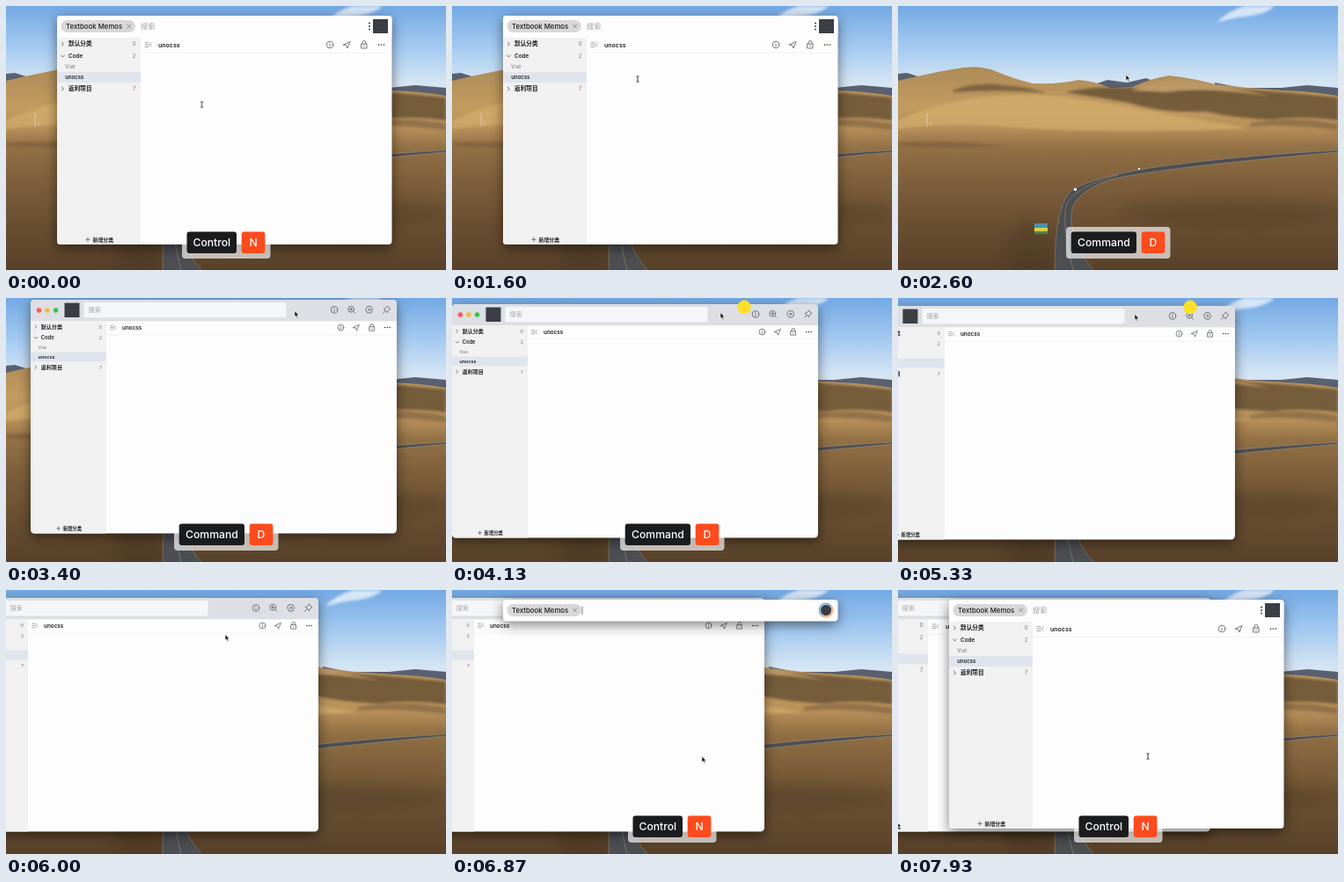
An HTML page for the animation above (8000 ms loop, 500 by 300 pixels).

```html
<!DOCTYPE html>
<html>
<head>
<meta charset="utf-8">
<title>Notes panel</title>
<style>
  html, body { margin: 0; width: 100%; height: 100%; overflow: hidden; background: #6b4d28; }
  svg.stage { display: block; width: 500px; height: 300px; }
  text { font-family: Inter, "Noto Sans CJK SC", "Noto Sans CJK", sans-serif; fill: #1d1d1f; }
  .bold { font-weight: 600; }
  .soft { fill: #777; }
  .hint { fill: #a3a3a6; }
  .line { fill: none; stroke: #55575b; stroke-width: .8; stroke-linecap: round; stroke-linejoin: round; }
  .key { font-size: 12.2px; font-weight: 500; fill: #fff; text-anchor: middle; }
  .shadow { filter: drop-shadow(0 4px 7px rgba(0, 0, 0, .5)); }

  /* One shared 8 s clock: 1% = 80 ms */
  .t { animation-duration: 8s; animation-iteration-count: infinite; animation-timing-function: step-end; }

  .popup { animation-name: popup; }
  @keyframes popup { 0% { display: inline } 31.6% { display: none } 84% { display: inline } }
  .open { animation-name: open; }
  @keyframes open { 0% { visibility: visible } 31.6% { visibility: hidden } 89.2% { visibility: visible } }
  .before { animation-name: before; }
  @keyframes before { 0% { visibility: inherit } 89.2% { visibility: hidden } }
  .after { animation-name: after; }
  @keyframes after { 0% { visibility: hidden } 89.2% { visibility: inherit } }
  .loading { animation-name: loading; }
  @keyframes loading { 0% { visibility: hidden } 84% { visibility: visible } 89.2% { visibility: hidden } }

  .window { animation-name: shown, drag; animation-timing-function: step-end, linear; }
  @keyframes shown { 0% { visibility: hidden } 36.25% { visibility: visible } }
  @keyframes drag {
    0%, 43.75% { transform: translate(28px, 2px) }
    51.625% { transform: translate(0, 7px) }
    66.625% { transform: translate(-33px, 9px) }
    71.25%, 100% { transform: translate(-61px, 9px) }
  }
  .press { animation-name: press; }
  @keyframes press { 0% { visibility: hidden } 43.75% { visibility: visible } 71.25% { visibility: hidden } }

  .control, .command { animation-timing-function: linear; }
  .control { animation-name: control; }
  @keyframes control { 0%, 9% { opacity: 1 } 11%, 82% { opacity: 0 } 82.5%, 100% { opacity: 1 } }
  .command { animation-name: command; }
  @keyframes command { 0%, 29.5% { opacity: 0 } 30%, 55% { opacity: 1 } 57%, 100% { opacity: 0 } }

  .cursor { animation-name: cursor; animation-timing-function: ease-in-out; }
  @keyframes cursor {
    0% { transform: translate(222.5px, 112px) }
    20% { transform: translate(211px, 83px) }
    32.5%, 36.25% { transform: translate(259px, 78px) }
    43.75% { transform: translate(332px, 11px); animation-timing-function: linear }
    51.625% { transform: translate(305px, 16.5px); animation-timing-function: linear }
    66.625% { transform: translate(269px, 18.3px); animation-timing-function: linear }
    71.25% { transform: translate(241px, 18.3px) }
    83.75%, 100% { transform: translate(284px, 189px) }
  }
  .arrow { animation-name: arrow; }
  @keyframes arrow { 0% { visibility: hidden } 31.6% { visibility: visible } 89.2% { visibility: hidden } }

  .spin { transform-origin: 425px 23px; animation: spin 1s linear infinite; }
  @keyframes spin { to { transform: rotate(360deg) } }
</style>
</head>
<body>
<svg class="stage" viewBox="0 0 500 300">
  <defs>
    <linearGradient id="sky" x2="0" y2="1">
      <stop stop-color="#73a9e4"/><stop offset=".4" stop-color="#a3c9f0"/><stop offset=".75" stop-color="#d3e4f3"/><stop offset="1" stop-color="#dce8f0"/>
    </linearGradient>
    <linearGradient id="land" gradientUnits="userSpaceOnUse" x1="0" y1="68" x2="0" y2="300">
      <stop stop-color="#ac8a58"/><stop offset=".2" stop-color="#c29b60"/><stop offset=".3" stop-color="#b8905a"/>
      <stop offset=".4" stop-color="#937146"/><stop offset=".57" stop-color="#7d5f3b"/>
      <stop offset=".78" stop-color="#694f32"/><stop offset="1" stop-color="#584129"/>
    </linearGradient>
    <filter id="blur1" x="-30%" y="-60%" width="160%" height="220%"><feGaussianBlur stdDeviation="1.6"/></filter>
    <filter id="blur2" x="-50%" y="-90%" width="200%" height="280%"><feGaussianBlur stdDeviation="9"/></filter>
    <clipPath id="popupClip"><rect x="58" y="11" width="380.5" height="260" rx="4"/></clipPath>
    <clipPath id="windowClip"><rect width="416" height="265.5" rx="4.5"/></clipPath>

    <g id="info" class="line"><circle r="3.8"/><path d="M0-.4V2M0-2v.1"/></g>
    <path id="chevron" class="line" d="M-1.2-2L1 0L-1.2 2"/>

    <!-- Note list, title and tool icons, measured from the top of the panel body -->
    <g id="notes">
      <rect width="95" height="300" fill="#f1f1f2"/>
      <rect y="39" width="95" height="12" fill="#dfe4ed"/>
      <use href="#chevron" x="6.5" y="7"/>
      <use href="#chevron" transform="translate(6.5 21) rotate(90)"/>
      <use href="#chevron" x="6.5" y="58"/>
      <g font-size="6.7" class="bold">
        <text x="13" y="9.4">默认分类</text>
        <text x="13" y="23.3" font-size="6.4">Code</text>
        <text x="13" y="60.4">返利项目</text>
      </g>
      <g font-size="6">
        <text class="soft" x="9.3" y="35.3">Vue</text>
        <text class="bold" x="9.3" y="47.2">unocss</text>
        <g text-anchor="end">
          <text class="soft" x="89.5" y="9.2">0</text>
          <text class="soft" x="89.5" y="23.2">2</text>
          <text class="soft" x="89.5" y="60.2">7</text>
        </g>
      </g>
      <path class="line" stroke-opacity=".65" d="M100 5.6h4M100 8h4M100 10.4h4M107 5.8l-2 2.2l2 2.2"/>
      <text class="bold" x="115" y="10.5" font-size="7">unocss</text>
      <path d="M95 17.2H470" stroke="#ededee" stroke-width=".7"/>
    </g>
    <g id="footer">
      <path class="line" stroke="#1d1d1f" d="M32.8 0h4.4M35-2.2v4.4"/>
      <text class="bold" x="40.5" y="2.2" font-size="5.9">新增分类</text>
    </g>
    <g id="tools">
      <use href="#info" x="-70.5" y="8"/>
      <path class="line" d="M-55 8l7.5-3.5l-3 7.5l-1.5-3.2z"/>
      <path class="line" d="M-34.5 7h6v5h-6zM-33.5 7V5.5a2 2 0 0 1 4 0V7M-31.5 9v1"/>
      <g fill="#333"><circle cx="-15" cy="8" r=".85"/><circle cx="-12" cy="8" r=".85"/><circle cx="-9" cy="8" r=".85"/></g>
    </g>
  </defs>

  <!-- Wallpaper -->
  <rect width="500" height="115" fill="url(#sky)"/>
  <path d="M362 19Q376 5 394 0H428Q420 8 402 11Q380 13 362 19Z" fill="#f4f8fc" opacity=".75" filter="url(#blur1)"/>
  <path d="M0 77l10-1l16 5v8H0ZM226 88l12-4l22 3l22-5l10 4v10h-70ZM360 87l30 6h45l30-3l35 3v12H360Z" fill="#596071"/>
  <path d="M0 85Q38 76 62 72Q88 66 108 73Q132 83 153 88Q185 89 205 84Q222 85 242 93L266 92Q288 82 308 79Q335 82 360 89Q400 94 440 96Q470 97 500 102V300H0Z" fill="url(#land)"/>
  <g fill="#584430" filter="url(#blur1)">
    <path d="M62 96Q88 86 118 90Q150 92 168 99Q122 94 62 98Z" opacity=".6"/>
    <path d="M190 98Q235 89 285 95Q335 93 380 94Q440 98 500 104V130Q455 124 425 129Q385 128 350 120Q300 122 262 110Q230 104 190 98Z" opacity=".72"/>
    <path d="M400 133Q450 124 500 134V141Q440 134 400 137Z" opacity=".4"/>
    <path d="M0 155Q60 151 120 160Q50 162 0 159Z" opacity=".3"/>
  </g>
  <path d="M265 96Q305 78 350 88Q390 94 424 103Q350 91 305 98Z" fill="#bb9865" filter="url(#blur1)"/>
  <path d="M0 130Q80 93 190 103Q290 120 400 139Q250 146 130 138Q60 131 0 140Z" fill="#d8b270" opacity=".6" filter="url(#blur1)"/>
  <g fill="#3d2d1c" filter="url(#blur2)" opacity=".3">
    <ellipse cx="380" cy="235" rx="130" ry="14"/><ellipse cx="150" cy="285" rx="28" ry="40"/>
  </g>
  <path d="M500 164Q390 170 300 182Q225 193 198 209Q178 226 178 300H222Q195 269 197 235Q200 211 242 197Q300 183.500 500 166Z" fill="#4c4e52"/>
  <path d="M500 164Q390 170 300 182Q225 193 198 209Q178 226 178 300M222 300Q195 269 197 235Q200 211 242 197Q300 183.500 500 166" fill="none" stroke="#b5aea0" stroke-width=".6" opacity=".6"/>
  <path d="M199 300Q186 250 191 227Q198 207 250 192" fill="none" stroke="#c5b78a" stroke-width=".6" opacity=".6"/>
  <path d="M33 122v15M37 132v4" stroke="#e9dfcd" stroke-width=".8" opacity=".8"/>
  <path d="M200 207h3v3h-3zM273 184h2v2h-2z" fill="#eee"/>
  <path d="M155 247h15v6h-15z" fill="#4d91a6"/><path d="M155 252h15v4h-15z" fill="#d8cc50"/><path d="M155 256h15v3h-15z" fill="#488b45"/>

  <!-- Detached window -->
  <g class="t window">
    <g class="shadow"><rect width="416" height="265.5" rx="4.5" fill="#fdfdfd"/></g>
    <g clip-path="url(#windowClip)">
      <rect width="416" height="24.3" fill="#dddfe4"/>
      <circle cx="9.5" cy="12" r="2.7" fill="#fb5b52"/><circle cx="19" cy="12" r="2.7" fill="#f6b932"/><circle cx="28.6" cy="12" r="2.7" fill="#35c648"/>
      <rect x="38.5" y="3.6" width="17" height="16.4" fill="#3b3e45"/>
      <rect x="60.5" y="3" width="230" height="17.3" rx="2" fill="#f5f6f8"/>
      <text class="hint" x="65.5" y="14.3" font-size="7.2">搜索</text>
      <use href="#info" x="345" y="11.4"/>
      <g class="line" transform="translate(0 -.3)">
        <circle cx="364.2" cy="11" r="3.4"/><path d="M366.8 13.6l2 2M362.7 11h3M364.2 9.5v3"/>
        <path d="M382.8 8h4l2 3.6l-2 3.6h-4l-2-3.6z"/><circle cx="384.8" cy="11.6" r="1"/>
        <path d="M405.5 7.5l3.5 3.5l-1.2.4l-2 2l-.3 1.6l-4.3-4.3l1.6-.3l2-2zM403 13l-2.3 2.5"/>
      </g>
      <g transform="translate(0 24.3)">
        <g class="t before"><g transform="scale(.905)">
          <use href="#notes"/><use href="#footer" y="260.3"/><use href="#tools" x="460"/>
        </g></g>
        <g class="t after">
          <use href="#notes"/><use href="#footer" y="235.5"/><use href="#tools" x="416"/>
        </g>
      </g>
    </g>
  </g>
  <circle class="t press" cx="332" cy="10.4" r="7.8" fill="#fddf2b"/>

  <!-- Launcher panel -->
  <g class="t popup">
    <g class="shadow">
      <rect x="58" y="11" width="380.5" height="24.5" rx="4" fill="#fdfdfd"/>
      <rect class="t open" x="58" y="11" width="380.5" height="260" rx="4" fill="#fdfdfd"/>
    </g>
    <rect x="62.5" y="16" width="84.5" height="14" rx="7" fill="#d8d8d9"/>
    <text x="68" y="25.8" font-size="7.8" font-weight="500">Textbook Memos</text>
    <path class="line" stroke-opacity=".7" d="M137.7 21l4 4m0-4l-4 4"/>
    <g class="t open">
      <text class="hint" x="153" y="25.8" font-size="8.2">搜索</text>
      <g fill="#3b3e45">
        <circle cx="413" cy="19.5" r="1"/><circle cx="413" cy="23" r="1"/><circle cx="413" cy="26.5" r="1"/>
        <rect x="417" y="15" width="17" height="16"/>
      </g>
      <g clip-path="url(#popupClip)"><g transform="translate(58 36)">
        <use href="#notes"/><use href="#footer" y="229.3"/><use href="#tools" x="380.5"/>
      </g></g>
    </g>
    <g class="t loading">
      <path d="M148 18.5v9.5" stroke="#555" stroke-width=".8"/>
      <circle cx="425" cy="23" r="6.2" fill="#3b3e45"/>
      <g class="spin" fill="none" stroke-width="1.4">
        <path d="M417.4 23a7.6 7.6 0 0 1 15.2 0" stroke="#3f8fd0"/>
        <path d="M432.6 23a7.6 7.6 0 0 1-15.2 0" stroke="#ec8744"/>
      </g>
    </g>
  </g>

  <!-- Pressed keys -->
  <g class="t control">
    <rect x="200" y="251" width="100.5" height="36" rx="4" fill="#fff" fill-opacity=".66"/>
    <rect x="205.5" y="256.5" width="56.5" height="24.5" rx="3" fill="#1b1c1e"/>
    <rect x="267.7" y="256.5" width="26.7" height="24.5" rx="3" fill="#fd4b1e"/>
    <text class="key" x="233.8" y="273.2">Control</text><text class="key" x="281" y="273.2">N</text>
  </g>
  <g class="t command">
    <rect x="191" y="251" width="118.5" height="36" rx="4" fill="#fff" fill-opacity=".66"/>
    <rect x="196.7" y="256.5" width="74.3" height="24.5" rx="3" fill="#1b1c1e"/>
    <rect x="276.7" y="256.5" width="26.7" height="24.5" rx="3" fill="#fd4b1e"/>
    <text class="key" x="233.9" y="273.2">Command</text><text class="key" x="290" y="273.2">D</text>
  </g>

  <!-- Pointer -->
  <g class="t cursor">
    <path class="t arrow" d="M0 0V6.6L1.5 5.3L2.6 7.7L3.7 7.2L2.7 4.9H4.7Z" fill="#000" stroke="#fff" stroke-width=".6"/>
    <path class="t open" d="M-1.5-3.3Q0-3.3 0-2.4Q0-3.3 1.5-3.3M0-2.6V2.6M-1.5 3.3Q0 3.3 0 2.4Q0 3.3 1.5 3.3" fill="none" stroke="#222" stroke-width=".9"/>
  </g>
</svg>
</body>
</html>
```
